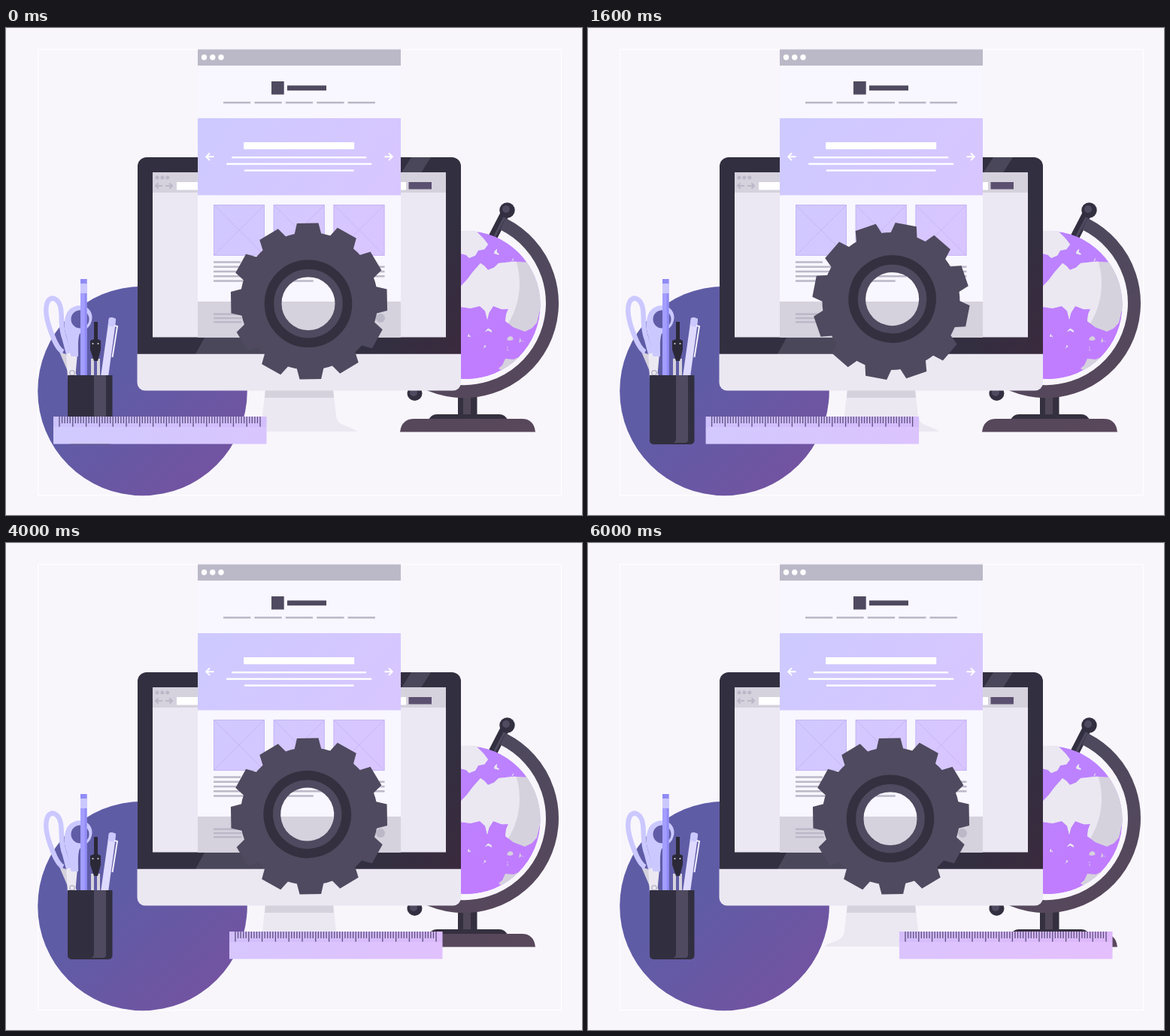
Recreate the animation shown at these times as an HTML page. Size 766x648 px, loop 6400 ms.

```html
<!DOCTYPE html>
<html lang="en">
<head>
<meta charset="utf-8">
<title>Web design desk</title>
<style>
html, body { margin: 0; width: 100%; height: 100%; overflow: hidden; background: #f8f6fb; }
svg { display: block; width: 766px; height: 648px; }
</style>
</head>
<body>
<svg viewBox="0 0 766 648" xmlns="http://www.w3.org/2000/svg">
  <defs>
    <linearGradient id="disc" x1="0.1" y1="0.1" x2="0.85" y2="0.9">
      <stop offset="0.4" stop-color="#5f5ca6"/><stop offset="1" stop-color="#7353a1"/>
    </linearGradient>
    <linearGradient id="bezel" gradientUnits="userSpaceOnUse" x1="175" y1="172" x2="605" y2="433">
      <stop offset="0.8" stop-color="#322f40"/><stop offset="1" stop-color="#3b2a3e"/>
    </linearGradient>
    <linearGradient id="lilac" gradientUnits="userSpaceOnUse" x1="255" y1="120" x2="525" y2="300">
      <stop stop-color="#cdcaff"/><stop offset="1" stop-color="#dac5ff"/>
    </linearGradient>
    <linearGradient id="strip" gradientUnits="userSpaceOnUse">
      <stop stop-color="#d0caff"/><stop offset="1" stop-color="#e4bffd"/>
    </linearGradient>
    <linearGradient id="sea" x1="0" y1="0" x2="0.6" y2="1">
      <stop stop-color="#b986ff"/><stop offset="1" stop-color="#c17cff"/>
    </linearGradient>
    <linearGradient id="iron" gradientUnits="userSpaceOnUse" x1="600" y1="260" x2="700" y2="537">
      <stop stop-color="#4d495e"/><stop offset="1" stop-color="#59475b"/>
    </linearGradient>
    <clipPath id="ball"><circle cx="612" cy="368.5" r="98.7"/></clipPath>
    <clipPath id="day"><circle cx="582" cy="340" r="101"/></clipPath>
    <clipPath id="frame"><path d="M175 434V184a12 12 0 0 1 12-12H593a12 12 0 0 1 12 12V434z"/></clipPath>
  </defs>

  <rect x="42.5" y="28.5" width="696" height="593" fill="none" stroke="#fff"/>
  <circle cx="181.5" cy="483" r="139.3" fill="url(#disc)"/>

  <g id="globe">
    <circle cx="543.5" cy="486" r="10" fill="#322f40"/>
    <circle cx="542" cy="485" r="5" fill="#4f4a5f"/>
    <path d="M601 488h25.5v29H601z" fill="#35303f"/>
    <path d="M608 490h10v25h-10z" fill="#504858"/>
    <path d="M562 522q3-8 11-8h83q8 0 11 8z" fill="#35303f"/>
    <path d="M524 537.5q2-17.5 19-17.5h143q16 0 18 17.5z" fill="url(#iron)"/>
    <path d="M646 281l18-35" stroke="#322f40" stroke-width="12"/>
    <path d="M650 277l15-29" stroke="#4f4a5f" stroke-width="3"/>
    <path d="M660.800 260.700A117.500 117.500 0 1 1 554 470" fill="none" stroke="url(#iron)" stroke-width="17"/>
    <circle cx="666.5" cy="242.5" r="10.2" fill="#322f40"/>
    <circle cx="665" cy="241" r="5" fill="#4f4a5f"/>
    <g clip-path="url(#ball)">
      <circle cx="612" cy="368.5" r="98.7" fill="url(#sea)"/>
      <g id="land" fill="#d5d2dd"></g>
      <use href="#land" clip-path="url(#day)" id="lit"/>
    </g>
  </g>

  <g id="foot">
    <path d="M345 480L341 516Q340 526 331 529L320 533Q316 535 316 537H467Q464 534 458 532L448 528Q440 525 439 516L435 480z" fill="#ebe8f2"/>
    <path d="M345 480h90l1 12h-92z" fill="#d5d2dd"/>
  </g>

  <g id="monitor">
    <g clip-path="url(#frame)">
      <path d="M175 172h430v262H175z" fill="url(#bezel)"/>
      <path d="M539 172h26l-14 22h-26zM265 410h135v24H252z" fill="#4b475a"/>
    </g>
    <path d="M174.500 433.800H605V472a10.500 10.500 0 0 1-10.500 10.500H185a10.500 10.500 0 0 1-10.500-10.500z" fill="#ebe8f2"/>
    <path d="M195 192h390v219.500H195z" fill="#ebe8f3"/>
    <path d="M195 192h390v27H195z" fill="#d5d2dd"/>
    <path d="M201 199h14" stroke="#bbb8c8" stroke-width="5" stroke-linecap="round" stroke-dasharray="0 6.9"/>
    <path d="M208 210h-9M202.500 206.500L199 210l3.500 3.500M212 210h9M217.500 206.500L221 210l-3.500 3.500" fill="none" stroke="#bbb8c8" stroke-width="2"/>
    <path d="M227 205h305v10.500H227z" fill="#fff"/>
    <path d="M535.500 205H566v9.500h-30.500z" fill="#5c5070"/>
  </g>

  <g id="page"></g>

  <g id="tools">
    <path d="M80 434L96 466H86L71 431z" fill="#d5d2dd"/>
    <path d="M80 430L95 433 92 466H82z" fill="#ebe8f2"/>
    <path d="M76 431Q69 428 62 410C55 393 50 374 56 363C62 356 71 361 73 374C75 390 72 399 78 414L83 433" fill="none" stroke="#cbc8ff" stroke-width="6.5"/>
    <path d="M89 434L84 412C78 396 79 376 95 372.500C108 371 113 380 111 389C108 401 98 399 95 406C92 413 93 423 93 434z" fill="#cbc8ff" stroke="#cbc8ff" stroke-width="6"/>
    <circle cx="98.5" cy="387.5" r="12" fill="#605ca6"/>
    <circle cx="88" cy="459" r="3.2" fill="none" stroke="#bbb8c8" stroke-width="1.5"/>
    <path d="M99 334h8.500v130H99z" fill="#a39eff"/>
    <path d="M99 334h8.500v7H99zM104.700 353h2.800v111h-2.800z" fill="#908bf5"/>
    <path d="M99 340h8.500v13H99z" fill="#cbc8ff"/>
    <path d="M113 440h4v24h-4zM121 440h4v24h-4z" fill="#d5d2dd"/>
    <path d="M117 391h5v23l4 2v12l-4 15h-5l-5-15v-12l5-2z" fill="#2b2938"/>
    <path d="M115.500 420h7.100" stroke="#d5d2dd" stroke-width="2.2" stroke-linecap="round" stroke-dasharray="0 7"/>
    <path d="M137 386q4-2 9 1l-1 11L136 464H126z" fill="#dedaff"/>
    <path d="M137 386q4-2 9 1l-1.500 11-9-2z" fill="#cbc8ff"/>
    <path d="M144 396l4 1-6.500 41" fill="none" stroke="#f3f1ff" stroke-width="2"/>
    <path d="M82 462h59.500v87a5 5 0 0 1-5 5H87a5 5 0 0 1-5-5z" fill="#312f3f"/>
    <path d="M117 462h16v86q0 4-4 4h-16q4-1 4-5z" fill="#4f4a5f"/>
  </g>

  <g id="gear" fill="none" stroke="#4f4a5f"></g>
  <g id="ruler"></g>
</svg>

<script>
const $ = id => document.getElementById(id);
const rect = (x, y, w, h, fill) => `<rect x="${x}" y="${y}" width="${w}" height="${h}" fill="${fill}"/>`;
const path = (d, stroke, width) => `<path d="${d}" fill="none" stroke="${stroke}" stroke-width="${width}"/>`;
const dot = (x, y, r, fill) => `<circle cx="${x}" cy="${y}" r="${r}" fill="${fill}"/>`;
const repeat = (n, part) => Array.from({ length: n }, (_, i) => part(i)).join('');
const GREY = '#bbb8c8', DARK = '#4f4a5f';

// A line of placeholder text centred on the page
const centred = (y, w, h = 2.4) => rect(389.7 - w / 2, y, w, h, '#fff');

function column(i) {
  const x = 276 + i * 79.75;
  return rect(x, 235, 68, 68, 'url(#lilac)') +
    path(`M${x + .5} 235.5h67v67h-67zl67 67m0-67l-67 67`, '#c5b4f3', .9) +
    repeat(5, row => rect(x, 310.3 + row * 6.25, row === 0 ? 36 : row === 4 ? 53 : 68, 2.5, GREY));
}

function drawPage() {
  const arrow = 'h-10.500m5-4.800l-4.800 4.800 4.800 4.800';
  $('page').innerHTML =
    rect(255, 28, 270, 383.5, '#f8f6fe') + rect(255, 28.5, 270, 21.5, '#bbb9c8') +
    repeat(3, i => dot(263.5 + i * 11.25, 39, 3.7, '#fff')) +
    rect(353, 71, 16.7, 17.5, DARK) + rect(374, 76.5, 52, 6.7, DARK) +
    repeat(5, i => rect(289 + i * 41.4, 98, 36.3, 2.5, GREY)) +
    rect(255, 120, 270, 102.5, 'url(#lilac)') +
    centred(152, 147, 9.3) + centred(171, 179) + centred(179.7, 193) + centred(188.4, 145.5) +
    path('M276.500 171.300' + arrow, '#fff', 2) +
    `<g transform="translate(780 0) scale(-1 1)">${path('M276.500 171.300' + arrow, '#fff', 2)}</g>` +
    repeat(3, column) +
    rect(255, 364, 270, 47.5, '#d5d2dd') +
    repeat(3, i => rect(276, 379.5 + i * 5.25, 37.5, 2.5, GREY)) +
    dot(498, 386, 6, GREY);
}

function seeded(seed) {
  return () => (seed = seed * 16807 % 2147483647) / 2147483647;
}

function drawLand() {
  const rand = seeded(41);
  const jitter = size => (rand() - .5) * size;
  // Roughens an outline by shifting the middle of each side
  const coast = outline => {
    const pts = outline.split(' ').map(p => p.split(',').map(Number));
    const rough = pts.flatMap(([x, y], i) => {
      const [u, v] = pts[(i + 1) % pts.length];
      return [[x, y], [(x + u) / 2 + jitter(5), (y + v) / 2 + jitter(5)]];
    });
    return `<polygon points="${rough.join(' ')}"/>`;
  };
  const islet = (x, y) => coast([0, 1, 2].map(k => {
    const a = k * 2.1 + rand(), r = 2 + rand() * 4;
    return [x + r * Math.cos(a), y + r * Math.sin(a)].join();
  }).join(' '));

  $('land').innerHTML =
    coast('600,270 625,270 641,288 628,296 616,306 604,300') +
    coast('602,352 613,335 631,313 641,322 655,313 700,312 714,350 706,392 690,404 664,390 668,374 648,370 640,388 630,370 604,371') +
    coast('655,453 664,440 684,437 676,460') +
    islet(652, 299) + islet(673, 310) + islet(616, 410) + islet(641, 404) +
    islet(635, 425) + islet(670, 414) + islet(684, 417) + islet(668, 428);
  // The same coasts again, brighter, on the day side
  const lit = document.createElementNS('http://www.w3.org/2000/svg', 'g');
  lit.setAttribute('clip-path', 'url(#day)');
  lit.setAttribute('fill', '#ebe8f2');
  lit.innerHTML = $('land').innerHTML;
  $('lit').replaceWith(lit);
}

function drawGear() {
  const tooth = i => `<path d="M384.500 277L388.700 259.700h28.600L421.500 277z" fill="${DARK}" stroke="none" transform="rotate(${i * 30 - 1} 403 363.5)"/>`;
  const ring = (x, y, r, width, color) =>
    `<circle cx="${x}" cy="${y}" r="${r}" stroke="${color}" stroke-width="${width}"/>`;
  // The hub sits slightly off the axis, so it wobbles as it turns
  $('gear').innerHTML = repeat(12, tooth) + ring(403, 363.5, 73, 37, DARK) +
    ring(402, 366.7, 47, 23, DARK) + ring(402, 366.7, 52, 12.5, '#35303f');
}

function drawRuler() {
  const ticks = repeat(76, i => `M${(8 + i * 3.56).toFixed(2)} 517v${i % 5 ? 9 : 13.5}`);
  $('ruler').innerHTML = rect(0, 517, 283.5, 36.5, 'url(#strip)') +
    rect(0, 517, 283.5, 14, '#9a78e818') + path(ticks, '#5b4f7c', 1.3);
}

const STEP = 200, LOOP = 6400, LAST = 30;

function draw(time) {
  const n = Math.min(LAST, Math.floor(time % LOOP / STEP));
  const x = 63 + n * 11.7;
  $('ruler').setAttribute('transform', `translate(${x.toFixed(1)} 0)`);
  // Keeps the ruler's tint tied to the stage
  $('strip').setAttribute('x1', 63 - x);
  $('strip').setAttribute('x2', 698 - x);
  $('gear').setAttribute('transform', `rotate(${n * 24} 403 363.5)`);
}

drawPage();
drawLand();
drawGear();
drawRuler();

const start = performance.now();
function tick() {
  draw(performance.now() - start);
  requestAnimationFrame(tick);
}
draw(0);
requestAnimationFrame(tick);
</script>
</body>
</html>
```
